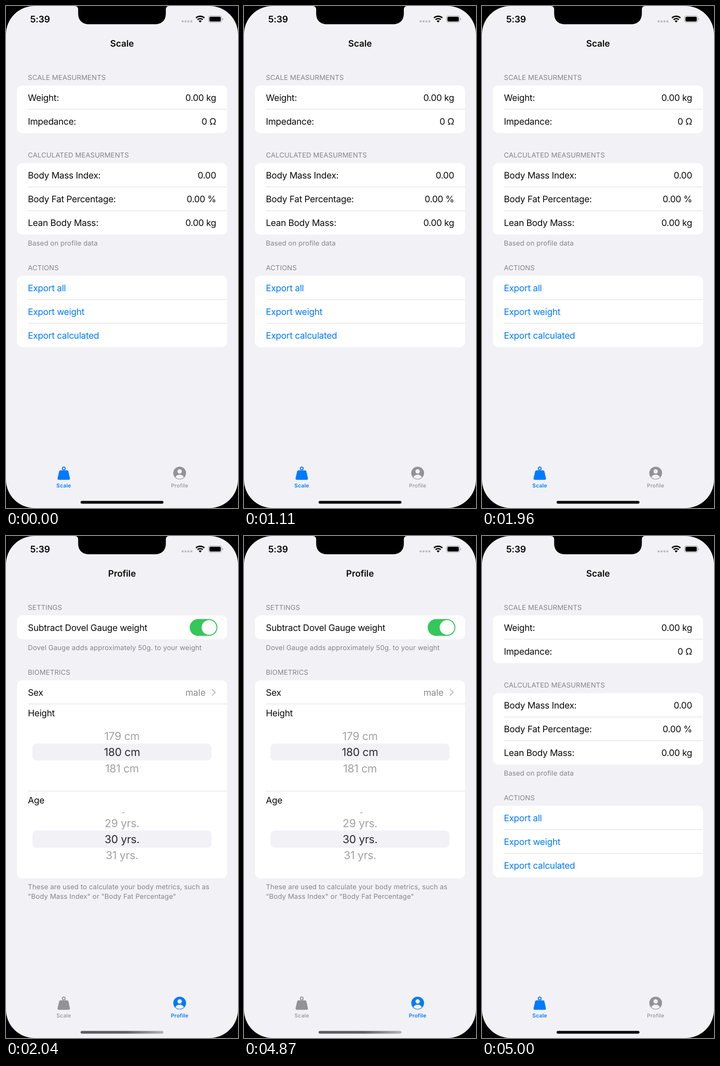
These frames come from a looping animation (509 px wide and 1100 px high, 5100 ms). An HTML page:

```html
<!DOCTYPE html>
<html lang="en">
<head>
<meta charset="utf-8">
<title>Body scale</title>
<style>
  html, body { margin: 0; width: 100%; height: 100%; overflow: hidden; background: #000; }
  svg { display: block; width: 100%; height: 100%; }
  text { font-family: Inter, Roboto, sans-serif; white-space: pre; text-rendering: geometricPrecision; }
  .body { font-size: 19.6px; letter-spacing: -.3px; fill: #0a0a0b; }
  .link { fill: #007aff; }
  .note { font-size: 15px; letter-spacing: .12px; fill: #85858a; }
  .title { font-size: 19.6px; font-weight: 600; letter-spacing: -.1px; fill: #0a0a0b; }
  .wheel { font-size: 24px; letter-spacing: -.3px; fill: #a2a2a5; }
  .picked { fill: #2b2b2d; }
  .muted { fill: #8a8a8e; letter-spacing: 0; }
  .clock { font-size: 20px; font-weight: 600; letter-spacing: -.2px; }
  .tab { font-size: 11.6px; font-weight: 500; letter-spacing: .3px; }
  .on { font-weight: 600; }
  .end { text-anchor: end; }
  .mid { text-anchor: middle; }
</style>
</head>
<body>
<svg id="stage" viewBox="0 0 509 1100" xmlns="http://www.w3.org/2000/svg"></svg>
<script>
const PAPER = '#f2f1f6', BLUE = '#007aff', GRAY = '#929297';
const LEFT = 48, RIGHT = 461, ROW = 52.2;

const text = (x, y, cls, str) => `<text x="${x}" y="${y}" class="${cls}">${str}</text>`;
const box = (x, y, w, h, r, fill, extra = '') =>
  `<rect x="${x}" y="${y}" width="${w}" height="${h}" rx="${r}" fill="${fill}" ${extra}/>`;
const path = (d, style) => `<path d="${d}" ${style}/>`;
const card = (y, h) => box(24, y, 461, h, 12, '#fff');
const rule = y => box(LEFT, y - .5, 437, 1, 0, '#d8d8db');
const note = (y, str) => text(LEFT, y, 'note', str);

// A card of equal rows, each with a label and an optional value
const list = (y, rows, cls = 'body') => card(y, rows.length * ROW) + rows.map(([label, value], i) => {
  const top = y + i * ROW;
  return (i ? rule(top) : '') + text(LEFT, top + 33.5, cls, label) +
    (value ? text(RIGHT, top + 33.5, 'body end', value) : '');
}).join('');

const picker = (y, values) => box(58, y - 18.7, 393, 37.4, 9, PAPER) +
  values.map((v, i) => text(254.5, y + 8.7 + (i - 1) * 35.4, 'wheel mid' + (i === 1 ? ' picked' : ''), v)).join('');

const tabs = active => {
  const [a, b] = [0, 1].map(i => i === active ? BLUE : GRAY);
  const label = (x, i, str, fill) =>
    `<text x="${x}" y="1054.8" class="tab mid${i === active ? ' on' : ''}" fill="${fill}">${str}</text>`;
  return `<circle cx="126.7" cy="1013.4" r="3.1" fill="none" stroke="${a}" stroke-width="2"/>` +
    path('M119.5 1017.5H134Q136.2 1017.5 136.8 1019.6L140.2 1034.6Q140.8 1038.2 137.2 1038.2H116.2Q112.6 1038.2 113.2 1034.6L116.7 1019.6Q117.3 1017.5 119.5 1017.5Z', `fill="${a}"`) +
    `<circle cx="381" cy="1023.5" r="14" fill="${b}"/>` +
    `<circle cx="381" cy="1019.8" r="4.8" fill="${PAPER}"/>` +
    path('M371.8 1032.6C373.4 1028.6 377 1026.9 381 1026.9S388.6 1028.6 390.2 1032.6A13 13 0 0 1 371.8 1032.6Z', `fill="${PAPER}"`) +
    label(126.8, 0, 'Scale', a) + label(381, 1, 'Profile', b);
};

const homeBar = fill => box(163.7, 1084.4, 181.8, 6, 3, fill);

const scaleScreen = text(254.5, 89.2, 'title mid', 'Scale') +
  note(162, 'SCALE MEASURMENTS') +
  list(174, [['Weight:', '0.00 kg'], ['Impedance:', '0 Ω']]) +
  note(332.3, 'CALCULATED MEASURMENTS') +
  list(344.3, [['Body Mass Index:', '0.00'], ['Body Fat Percentage:', '0.00 %'], ['Lean Body Mass:', '0.00 kg']]) +
  note(524.8, 'Based on profile data') +
  note(579, 'ACTIONS') +
  list(591, [['Export all'], ['Export weight'], ['Export calculated']], 'body link') +
  tabs(0) + homeBar('#000');

const profileScreen = text(254.5, 89.2, 'title mid', 'Profile') +
  note(162, 'SETTINGS') +
  list(174, [['Subtract Dovel Gauge weight']]) +
  box(403, 182, 60.8, 36.8, 18.4, '#34c759') +
  '<circle cx="445.5" cy="200.4" r="16.2" fill="#fff"/>' +
  note(250, 'Dovel Gauge adds approximately 50g. to your weight') +
  note(304, 'BIOMETRICS') +
  card(316.3, 433.7) +
  text(LEFT, 349.8, 'body', 'Sex') +
  text(438, 349.8, 'body muted end', 'male') +
  path('M452.5 336.3L459 342.6L452.5 348.9', 'fill="none" stroke="#c0c0c4" stroke-width="2.2" stroke-linecap="round" stroke-linejoin="round"') +
  rule(368) + text(LEFT, 395, 'body', 'Height') +
  picker(473.4, ['179 cm', '180 cm', '181 cm']) +
  rule(559) + text(LEFT, 586, 'body', 'Age') +
  path('M254.5 606.8Q258 607.4 259.8 605', 'fill="none" stroke="#a8a8ab" stroke-width="1.3"') +
  picker(664.2, ['29 yrs.', '30 yrs.', '31 yrs.']) +
  note(774, 'These are used to calculate your body metrics, such as') +
  note(795.3, '"Body Mass Index" or "Body Fat Percentage"') +
  tabs(1) + homeBar('url(#fade)');

const statusBar = text(53, 36.2, 'clock', '5:39') +
  [0, 1, 2, 3].map(i => box(385.3 + i * 6.4, 31.6, 4.4, 4.4, 1.4, '#bdbdc1')).join('') +
  path('M416.8 26.1A13.5 13.5 0 0 1 435.2 26.1M420.3 29.9A8.3 8.3 0 0 1 431.7 29.9', 'fill="none" stroke="#000" stroke-width="2.9"') +
  path('M426 36.2L422.7 32.8A4.6 4.6 0 0 1 429.3 32.8Z', 'fill="#000"') +
  box(444.3, 21.5, 28.9, 14.4, 4.3, 'none', 'stroke="#a3a3a7" stroke-width="1.1"') +
  box(446.3, 23.5, 24.9, 10.4, 2.6, '#000') +
  path('M474.7 26.4Q476.5 27 476.5 28.7T474.7 31Z', 'fill="#a3a3a7"');

const notch = path('M151 0Q158.3 0 158.3 8V16C158.3 31 167 40 182 40H327C342 40 350.7 31 350.7 16V8Q350.7 0 358 0Z', 'fill="#000"');

document.getElementById('stage').innerHTML =
  `<defs><linearGradient id="fade">
    <stop offset="0" stop-color="#5c5c5e"/><stop offset=".55" stop-color="#606063"/><stop offset="1" stop-color="#b4b4b8"/>
  </linearGradient></defs>` +
  box(0, 0, 509, 1100, 62, PAPER) + notch + statusBar +
  `<g id="scale">${scaleScreen}</g><g id="profile" opacity="0">${profileScreen}</g>`;

// Hard cuts between the two tabs
const LOOP = 5100;
const cuts = [[0, 'scale'], [2040, 'profile'], [5000, 'scale'], [LOOP, 'scale']];
for (const id of ['scale', 'profile']) {
  const frames = cuts.map(([t, shown]) => ({ offset: t / LOOP, opacity: shown === id ? 1 : 0, easing: 'step-end' }));
  document.getElementById(id).animate(frames, { duration: LOOP, iterations: Infinity });
}
</script>
</body>
</html>
```
